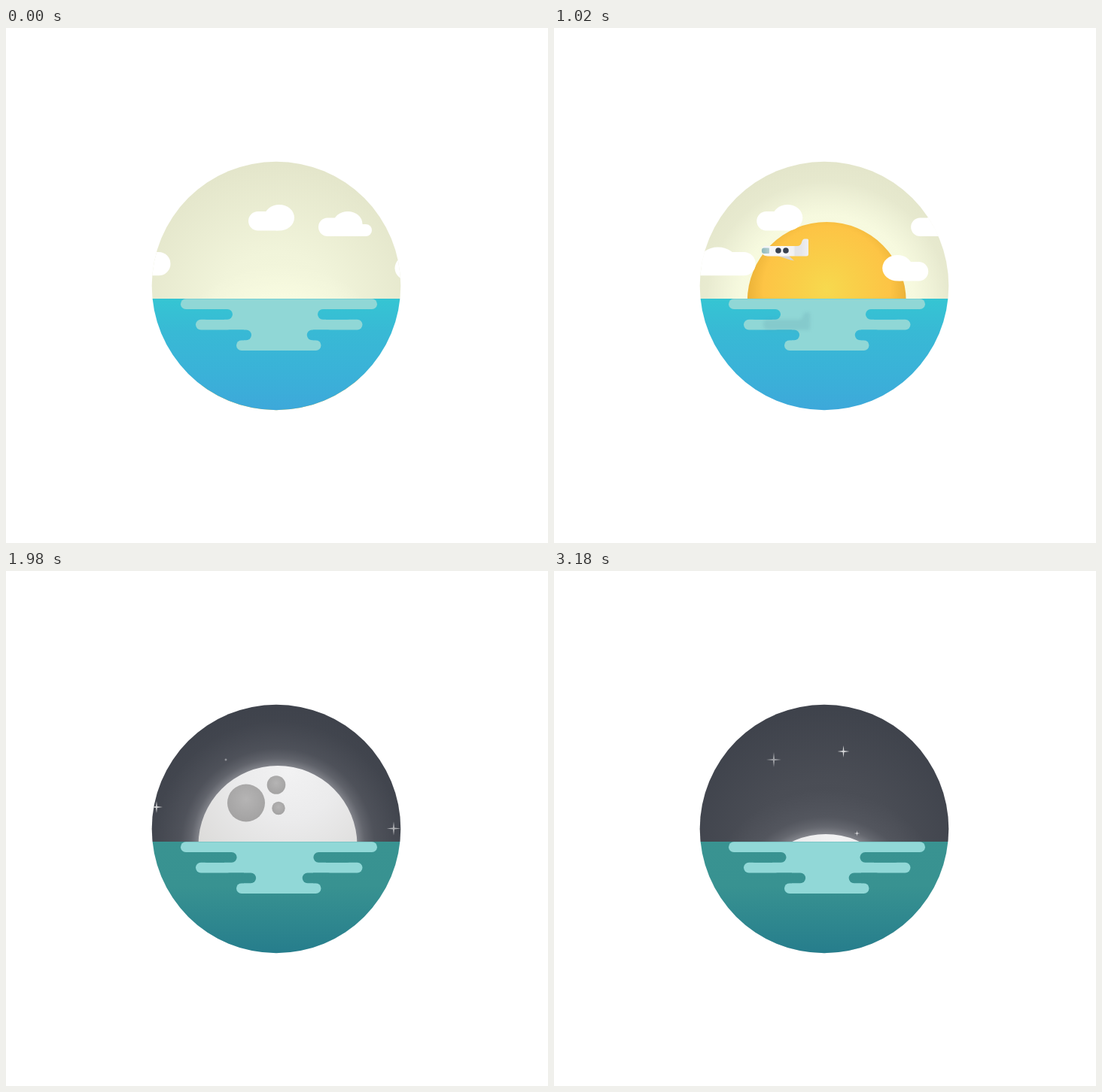
Recreate the animation shown at these times as an HTML page with a canvas. Size 720x685 px, loop 3.21 s.

```html
<!DOCTYPE html>
<html lang="en">
<head>
<meta charset="utf-8">
<title>Day and night</title>
<style>
html, body { margin: 0; width: 100%; height: 100%; overflow: hidden; background: #fff; }
canvas { display: block; }
</style>
</head>
<body>
<canvas id="stage" width="720" height="685"></canvas>
<script>
const g = document.getElementById('stage').getContext('2d');
const LOOP = 3210, STEP = 30, NIGHT = 1650, HORIZON = 360, TAU = Math.PI * 2;

const clamp = v => Math.max(0, Math.min(1, v));
const ease = p => (1 - Math.cos(Math.PI * clamp(p))) / 2;

// stops: alternating offset, colour
function gradient(grad, ...stops) {
  for (let i = 0; i < stops.length; i += 2) grad.addColorStop(stops[i], stops[i + 1]);
  return grad;
}
const radial = (x, y, r, ...stops) => gradient(g.createRadialGradient(x, y, 0, x, y, r), ...stops);
const vertical = (y0, y1, ...stops) => gradient(g.createLinearGradient(0, y0, 0, y1), ...stops);

function oval(x, y, rx, ry = rx, fill) {
  if (fill) g.fillStyle = fill;
  g.beginPath();
  g.ellipse(x, y, rx, ry, 0, 0, TAU);
  g.fill();
}
function pill(x0, y0, x1, y1, fill) {
  if (fill) g.fillStyle = fill;
  g.beginPath();
  g.roundRect(x0, y0, x1 - x0, y1 - y0, (y1 - y0) / 2);
  g.fill();
}

// Vertical offset of the sun or moon: up at the start, down just before the cut
function sink(age, length) {
  return 110 * (1 - ease(age / 270) + ease((age - length + 150) / 165));
}

function sky(night) {
  g.fillStyle = night
    ? radial(359, 380, 205, 0, '#4d5058', .5, '#4a4d55', 1, '#3e424b')
    : radial(359, 380, 205, 0, '#f5f8dd', .4, '#f1f4da', 1, '#e3e5ca');
  g.fillRect(190, 170, 340, 190);
}

function sun(t) {
  const dy = sink(t, NIGHT), x = 365 - .0027 * t;
  oval(x, 363.5 + dy, 160, 160, radial(x, 363.5 + dy, 160,
    0, '#f9fce1', .72, 'rgba(249,252,225,.8)', 1, 'rgba(247,250,224,0)'));
  oval(x, 363.5 + dy, 105.5, 105.5, radial(x, 348 + dy, 108,
    0, '#f7d94e', .35, '#f9cf49', .78, '#fdc445', 1, '#e9b036'));
}

function moon(t) {
  const dy = sink(t - NIGHT, LOOP - NIGHT), x = 361, y = 364.5 + dy;
  oval(x, y, 165, 165, radial(x, y, 165,
    0, 'rgba(235,235,238,.5)', .63, 'rgba(220,220,225,.42)',
    .7, 'rgba(200,200,206,.2)', .78, 'rgba(180,180,188,.08)', 1, 'rgba(160,160,170,0)'));
  oval(x, y, 105.5, 105.5, radial(x + 15, y - 100, 165, 0, '#f2f2f3', .4, '#ebebec', 1, '#dad9d7'));
  for (const [cx, cy, r] of [[319, 308.5, 25], [359, 284.5, 12.3], [362, 315.5, 8.7]])
    oval(cx, cy + dy, r, r, radial(cx, cy + dy - r * .2, r * 1.2, 0, '#b5b4b4', 1, '#a3a2a2'));
}

// Four-pointed star that grows with age, then fades
function star(x, y, age) {
  const h = age * .0062, alpha = Math.min(clamp(h / 2), clamp((13 - h) / 6.5));
  if (h <= 0 || !alpha) return;
  g.globalAlpha = alpha;
  g.fillStyle = '#fff';
  g.beginPath();
  for (let i = 0; i < 8; i++) {
    const a = i * TAU / 8, r = i % 2 ? h * .16 : h;
    g.lineTo(x + r * Math.cos(a), y + r * Math.sin(a));
  }
  g.fill();
  g.globalAlpha = 1;
}

function stars(t) {
  star(292, 251, t - 1577);
  star(384.5, 240, t - 1875);
  star(402.5, 349, t - 2560);
  star(200, 314, t - 690);
  star(515, 342.5, t - 480);
}

function smallCloud(x, y, dir) {
  pill(Math.min(x, x + 50 * dir), y + 9, Math.max(x, x + 50 * dir), y + 34.5, '#fff');
  oval(x + 41 * dir, y + 17.3, 20, 17.3);
}

function clouds(t) {
  smallCloud(322 - .0517 * t, 235, 1);
  smallCloud(577.5 - .0787 * t, 302, -1);

  const b = 415 + .058 * t;
  pill(b, 252.5, b + 50, 277);
  pill(b + 30, 261, b + 71, 277);
  oval(b + 39, 260.5, 19.5, 16.5);

  const c = 218.5 + .0483 * t;
  pill(c - 97, 298, c, 329.3);
  oval(c - 50, 310, 25, 18.5);
}

function planeShape() {
  g.beginPath();
  g.moveTo(5, 10);
  g.lineTo(47, 10);
  g.quadraticCurveTo(52, 10, 53, 5);
  g.quadraticCurveTo(54, .5, 57, .5);
  g.lineTo(60.5, .5);
  g.quadraticCurveTo(62, .5, 62, 2);
  g.lineTo(62, 21);
  g.quadraticCurveTo(62, 23.5, 59, 23.5);
  g.lineTo(8, 23.5);
  g.quadraticCurveTo(0, 23.5, 0, 16);
  g.quadraticCurveTo(0, 10, 5, 10);
}

function plane(t) {
  g.save();
  g.translate(465 - .2864 * (t - 360), 280);
  g.fillStyle = '#d3d5d9';
  g.beginPath();
  g.moveTo(21, 23);
  g.lineTo(36, 23);
  g.lineTo(43, 29.5);
  g.lineTo(38, 28.5);
  g.fill();
  planeShape();
  g.fillStyle = gradient(g.createLinearGradient(0, 0, 62, 0),
    0, '#f4f5f6', .45, '#f8f8fa', .68, '#f1f1f3', .72, '#e3e4e7', .85, '#e6e6e9', 1, '#f0f0f2');
  g.fill();
  g.fillStyle = gradient(g.createLinearGradient(0, 0, 10, 0), 0, '#8fb9bb', 1, '#b4cfd1');
  g.beginPath();
  g.roundRect(0, 12.5, 10, 7.5, [3, 1, 1, 3]);
  g.fill();
  oval(22, 16, 3.8, 3.8, '#39414f');
  oval(32, 16, 3.8);
  g.restore();
}

function planeShadow(t) {
  g.save();
  g.filter = 'blur(2px)';
  g.translate(467 - .2864 * (t - 360), 378);
  planeShape();
  g.fillStyle = 'rgba(90,150,165,.2)';
  g.fill();
  g.restore();
}

function water(t, night) {
  const fill = night
    ? vertical(HORIZON, 509, 0, '#399391', .4, '#389291', 1, '#267d8c')
    : vertical(HORIZON, 509, 0, '#35c5d3', .3, '#38b9d5', .65, '#3ab2d8', 1, '#3da8da');
  g.fillStyle = fill;
  g.fillRect(190, HORIZON, 340, 150);

  pill(232, 360.3, 493, 374, night ? '#91d8d7' : '#90d7d6');
  pill(252, 387.7, 473.5, 401.5);
  pill(306, 415.2, 418.5, 429);
  g.fillRect(290, 373, 135, 16);
  g.fillRect(316, 400, 92, 17);

  // Rounded inlets slide in and out between the bars
  const swing = (1 - Math.cos(TAU * (night ? t - NIGHT : t) / 1000)) / 2;
  const a = 7.6 * swing, b = 8.2 * swing;
  pill(260, 374, 301 + a, 387.7, fill);
  pill(414 - a, 374, 460, 387.7);
  pill(290, 401.5, 326 + b, 415.2);
  pill(399.8 - b, 401.5, 435, 415.2);
}

function draw(t) {
  const night = t >= NIGHT;
  g.fillStyle = '#fff';
  g.fillRect(0, 0, 720, 685);
  g.save();
  g.beginPath();
  g.arc(359, 343, 165.3, 0, TAU);
  g.clip();
  sky(night);
  if (night) {
    stars(t);
    moon(t);
  } else {
    sun(t);
    clouds(t);
    plane(t);
  }
  water(t, night);
  if (!night) planeShadow(t);
  g.restore();
}

const start = performance.now();
function tick() {
  const t = (performance.now() - start) % LOOP;
  draw(Math.floor(t / STEP) * STEP);
  requestAnimationFrame(tick);
}
tick();
</script>
</body>
</html>
```
